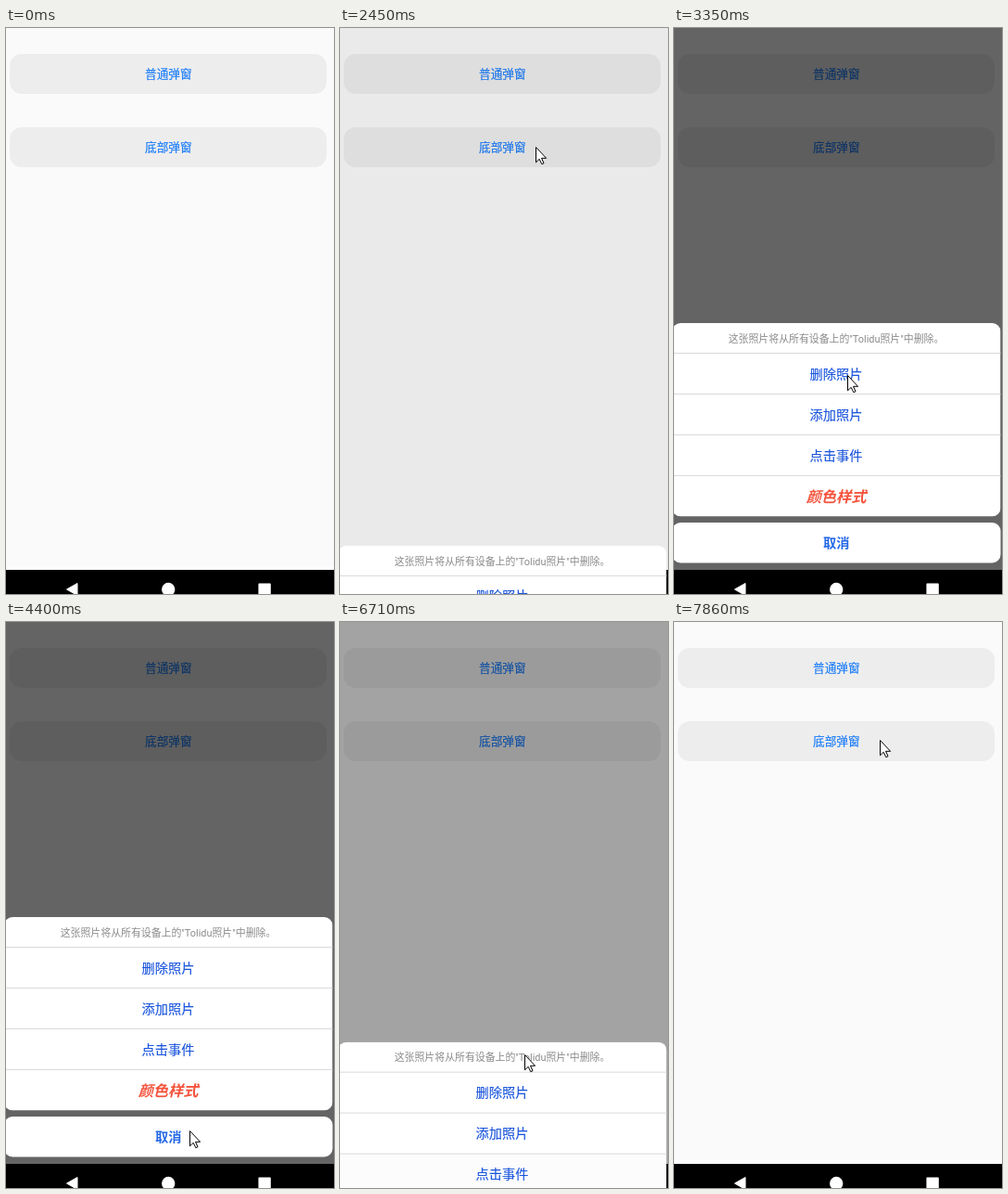
An HTML page that plays this animation: 354 px wide and 610 px high, repeating every 7.99 s.

```html
<!DOCTYPE html>
<html lang="zh">
<head>
<meta charset="utf-8">
<style>
  html, body { margin: 0; width: 100%; height: 100%; overflow: hidden; background: #fafafa; }
  svg { display: block; width: 354px; height: 610px; }
  text { font-family: Roboto, "Noto Sans CJK SC", "Noto Sans CJK", sans-serif; text-anchor: middle; }
  .button { fill: #ededed; }
  .label { font-size: 12.6px; fill: #1a7cfa; stroke: #1a7cfa; stroke-width: .2; }
  .title { font-size: 10.9px; fill: #8a8a8a; }
  .item { font-size: 14.2px; fill: #1a55dc; stroke: #1a55dc; stroke-width: .15; }
  .cancel { font-size: 14.2px; font-weight: 700; fill: #2468e6; }
  .accent { font-size: 16.2px; font-weight: 700; font-style: italic; fill: #f4533c; }
  .line { stroke: #dadada; }
</style>
</head>
<body>
<svg viewBox="0 0 354 610" lang="zh-CN">
  <defs>
    <clipPath id="card"><rect x="-2" y="318" width="354.5" height="208.5" rx="9"/></clipPath>
  </defs>

  <rect width="354" height="610" fill="#fafafa"/>
  <rect y="580" width="354" height="4" fill="#fdfdfd"/>
  <g id="buttons"></g>
  <rect id="dim" width="354" height="584"/>

  <rect y="584" width="354" height="26"/>
  <g fill="#fff">
    <path d="M65.5 605L77 598.5V611.5Z" stroke="#fff" stroke-linejoin="round"/>
    <circle cx="175.2" cy="605" r="7.2"/>
    <rect x="272.4" y="598.4" width="13.4" height="13.4" rx="1"/>
  </g>

  <g id="sheet">
    <g clip-path="url(#card)">
      <rect x="-2" y="318" width="354.5" height="208.5" fill="#fff"/>
      <rect id="press" width="353" height="44"/>
      <g id="rows"></g>
    </g>
    <text class="title" x="175" y="338.7">这张照片将从所有设备上的"Tolidu照片"中删除。</text>
    <rect x="-2" y="533" width="354.5" height="43.5" rx="9" fill="#fff"/>
    <text class="cancel" x="175.2" y="560">取消</text>
  </g>

  <path id="cursor" d="M.5 .5V16.8L4.2 13.3L6.8 18.7L9 17.7L6.5 12.3H11.6Z" fill="#fff" stroke="#000"/>
</svg>
<script>
  const LOOP = 7990;
  const TRAVEL = 292, SLIDE = 300;
  const OPEN = 2420, CLOSE = 6585;
  const PRESS_COLOR = 5520, PRESS_EVENT = 6440;
  const ROW_TOP = 350.5, ROW_HEIGHT = 44;

  const el = id => document.getElementById(id);
  const clamp = v => Math.max(0, Math.min(1, v));
  const progress = (t, from, to) => clamp((t - from) / (to - from));

  el("buttons").innerHTML = ["普通弹窗", "底部弹窗"].map((name, i) => {
    const y = 28 + 79 * i;
    return `<rect class="button" x="4" y="${y}" width="342" height="43" rx="13"/>
      <text class="label" x="175.3" y="${y + 26}">${name}</text>`;
  }).join("");

  el("rows").innerHTML = ["删除照片", "添加照片", "点击事件", "颜色样式"].map((name, i) => {
    const y = ROW_TOP + ROW_HEIGHT * i;
    const accent = i === 3;
    return `<path class="line" d="M0 ${y}H353"/>
      <text class="${accent ? "accent" : "item"}" x="175" y="${y + (accent ? 28 : 27)}">${name}</text>`;
  }).join("");

  // Pointer strokes: each goes on from the last; bend swings it sideways in half waves
  const home = { x: 350, y: 591 };
  const moves = [
    { from: 80, to: 130, x: 345, y: 555 },
    { from: 280, to: 1010, x: 195, y: 59, bend: -70 },
    { from: 1090, to: 1420, x: 207, y: 128, bend: 13 },
    { from: 1850, to: 2090, x: 211, y: 128, bend: -16, waves: 2 },
    { from: 2650, to: 2710, x: 203, y: 132 },
    { from: 2870, to: 3610, x: 201, y: 505, bend: -17 },
    { from: 3710, to: 4400, x: 198, y: 548 },
    { from: 4710, to: 5490, x: 203, y: 491, bend: -9, waves: 2 },
    { from: 5520, to: 5870, x: 199, y: 466 },
    { from: 6885, to: 7220, x: 207, y: 232 },
    { from: 7240, to: 7860, x: 222, y: 127, bend: 10 }
  ];

  function pointerAt(t) {
    let { x, y } = home;
    for (const m of moves) {
      const p = progress(t, m.from, m.to);
      x += (m.x - x) * p + (m.bend || 0) * Math.sin(Math.PI * p * (m.waves || 1));
      y += (m.y - y) * p;
      if (p < 1) break;
    }
    return [Math.round(x), Math.round(y)];
  }

  const tint = age => 0.08 * clamp(age / 60) * clamp((300 - age) / 200);

  function draw(t) {
    const opening = progress(t, OPEN, OPEN + SLIDE);
    const closing = progress(t, CLOSE, CLOSE + SLIDE);
    const shown = (1 - (1 - opening) ** 1.8) * (1 - closing) ** 1.135;

    el("dim").setAttribute("opacity", 0.6 * opening * (1 - closing));
    el("sheet").setAttribute("transform", `translate(0 ${(TRAVEL * (1 - shown)).toFixed(2)})`);
    el("sheet").setAttribute("visibility", shown > 0 ? "visible" : "hidden");

    const late = t >= PRESS_EVENT;
    el("press").setAttribute("y", ROW_TOP + ROW_HEIGHT * (late ? 2 : 3));
    el("press").setAttribute("opacity", tint(t - (late ? PRESS_EVENT : PRESS_COLOR)));

    el("cursor").setAttribute("visibility", t < moves[0].from ? "hidden" : "visible");
    el("cursor").setAttribute("transform", `translate(${pointerAt(t)})`);
  }

  const start = performance.now();
  function tick() {
    draw((performance.now() - start) % LOOP);
    requestAnimationFrame(tick);
  }
  tick();
</script>
</body>
</html>
```
